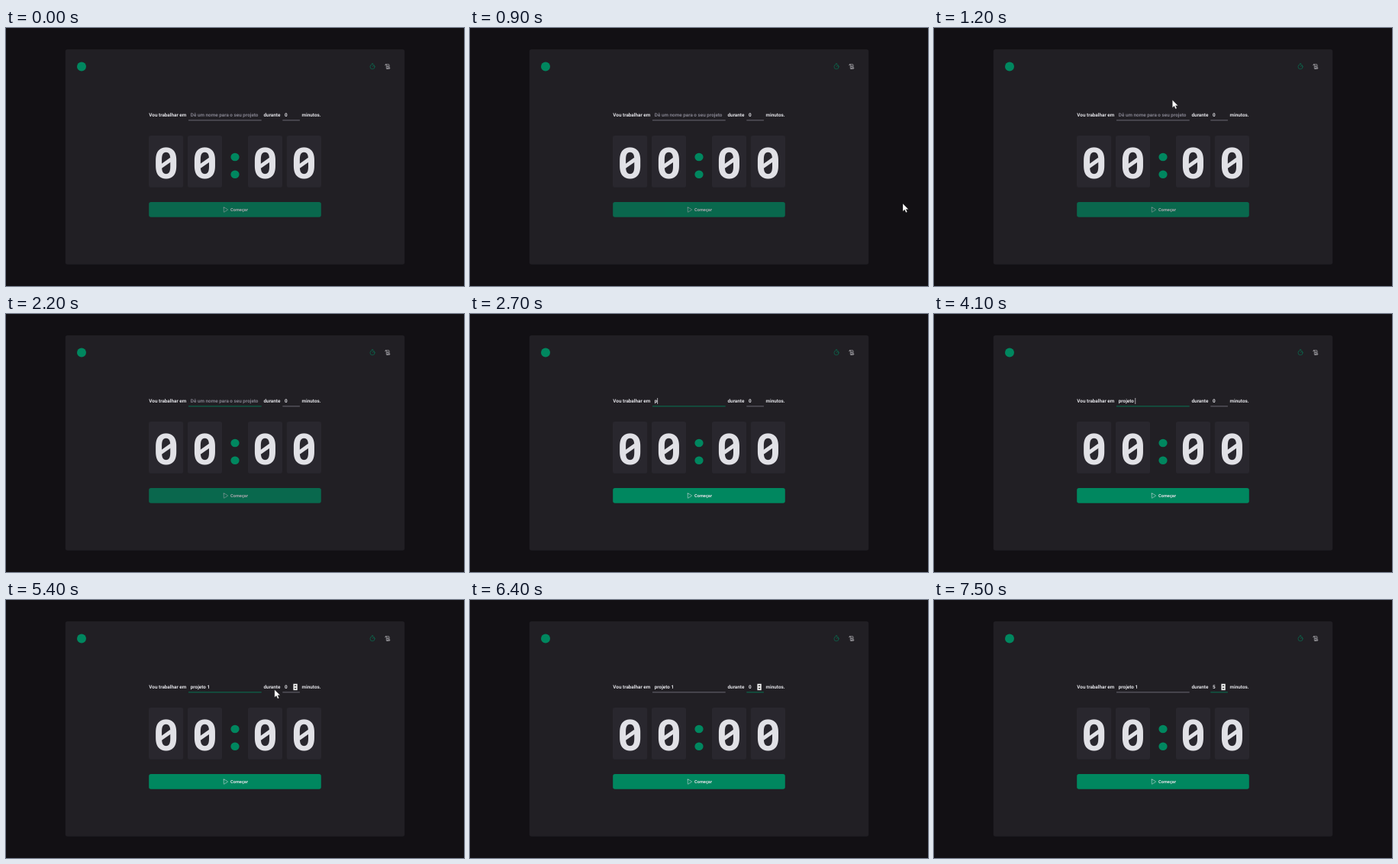
These frames come from a looping animation (600 px wide and 338 px high, 8000 ms). An HTML page:

```html
<!DOCTYPE html>
<html lang="pt">
<head>
<meta charset="utf-8">
<style>
  html, body { margin: 0; width: 100%; height: 100%; overflow: hidden; background: #121014; }
  svg { display: block; width: 100%; height: 100%; }
  text { font: 700 6.35px Roboto, sans-serif; fill: #e1e1e6; white-space: pre; text-rendering: geometricPrecision; }
  .digit { font-size: 56.4px; text-anchor: middle; }
  .icon { fill: none; stroke: #e1e1e6; stroke-width: 16; stroke-linecap: round; stroke-linejoin: round; }
  .green { fill: #00875f; }
</style>
</head>
<body>
<svg viewBox="0 0 600 338">
  <defs>
    <g id="zero">
      <rect x="-22.6" y="141" width="45.2" height="67.7" rx="2.8" fill="#29272e"/>
      <text class="digit" y="196.9">0</text>
      <path d="M-7 181.7L7 171.9" stroke="#e1e1e6" stroke-width="5"/>
    </g>
  </defs>
  <rect x="77.8" y="28" width="444.4" height="281.8" rx="2.8" fill="#211f24"/>

  <circle class="green" cx="99" cy="50.5" r="6"/>
  <g class="icon" style="stroke:#00875f" transform="translate(475.8 46.3) scale(.0331)">
    <circle cx="128" cy="136" r="92"/>
    <path d="M128 136l42-42M104 10h48"/>
  </g>
  <g class="icon" transform="translate(495.4 46.3) scale(.0331)">
    <path d="M45 80A24 24 0 1 1 88 64V192a24 24 0 1 0 43-16H219A24 24 0 0 1 200 216H112"/>
    <path d="M64 40H176a24 24 0 0 1 24 24V176M120 104h48M120 136h48"/>
  </g>

  <text x="187.3" y="116.3">Vou trabalhar em</text>
  <text x="337.5" y="116.3">durante</text>
  <text x="387.6" y="116.3">minutos.</text>
  <text id="project" x="241.8" y="116.3" xml:space="preserve"></text>
  <text id="minutes" x="365" y="116.3" xml:space="preserve"></text>
  <rect id="projectLine" x="239" y="120.5" width="95.7" height=".8"/>
  <rect id="minutesLine" x="362.3" y="120.5" width="22.6" height=".8"/>
  <rect id="caret" y="110" width=".7" height="8" fill="#e1e1e6"/>
  <g id="spinner">
    <rect x="376.4" y="109.8" width="5.3" height="8.4" fill="#efefef"/>
    <path d="M377.6 113l1.45-1.9 1.45 1.9zM377.6 115l1.45 1.9 1.45-1.9z" fill="#333"/>
  </g>

  <use href="#zero" x="209.6"/>
  <use href="#zero" x="260.5"/>
  <use href="#zero" x="339.5"/>
  <use href="#zero" x="390.4"/>
  <ellipse class="green" cx="300" cy="169" rx="5.6" ry="5.3"/>
  <ellipse class="green" cx="300" cy="191.8" rx="5.6" ry="5.3"/>

  <g id="button">
    <rect class="green" x="187.2" y="228" width="225.6" height="19.8" rx="2.8"/>
    <path class="icon" transform="translate(282.9 233.8) scale(.0331)" d="M72 40V216a8 8 0 0 0 12 7L228 135a8 8 0 0 0 0-14L84 33a8 8 0 0 0-12 7z"/>
    <text x="294.1" y="240.1" style="font-size:5.65px">Começar</text>
  </g>

  <path id="cursor" d="M0 0V10.2L2.4 8 4.1 11.8 5.8 11 4.2 7.4H7.4z" fill="#fff" stroke="#111" stroke-width=".3"/>
</svg>
<script>
const $ = id => document.getElementById(id);
const LOOP = 8000;

const projectKeys = [[0, ''], [2700, 'p'], [2900, 'pr'], [3100, 'pro'], [3400, 'proj'], [3500, 'proje'],
  [3700, 'projet'], [3800, 'projeto'], [4100, 'projeto '], [4800, 'projeto 1']];
const minuteKeys = [[0, '0'], [6900, ''], [7000, '5']];
const caretKeys = [[0, 0], [1700, 1], [2200, 0], [2700, 1], [4700, 0], [4800, 1], [5400, 0],
  [5800, 1], [6400, 0], [6800, 1], [7500, 0]];

// Pointer passes: time, x, y; each ends when the pointer enters a field
const passes = [
  { end: 1700, points: [[900, 567, 230], [1200, 312.3, 94.3], [1400, 98, 36], [1600, 225, 98], [1700, 260, 112]] },
  { end: 5600, points: [[5400, 351.8, 117.4], [5600, 364, 113]] }
];

const valueAt = (keys, t) => keys.findLast(k => k[0] <= t)[1];
const show = (id, on) => $(id).setAttribute('visibility', on ? 'visible' : 'hidden');

function field(id, value, placeholder, focused) {
  const text = $(id);
  text.textContent = value || placeholder;
  text.style.fill = value ? '#e1e1e6' : '#82808c';
  $(id + 'Line').setAttribute('fill', focused ? '#00875f' : '#7c7a85');
  if (focused) {
    const width = value ? text.getComputedTextLength() : 0;
    $('caret').setAttribute('x', +text.getAttribute('x') + width);
  }
}

function movePointer(t) {
  const step = Math.floor(t / 100) * 100;
  const pass = passes.find(p => step >= p.points[0][0] && step < p.end);
  show('cursor', pass);
  if (!pass) return;
  const i = pass.points.findIndex(p => p[0] > step);
  const [t0, x0, y0] = pass.points[i - 1], [t1, x1, y1] = pass.points[i];
  const k = (step - t0) / (t1 - t0);
  $('cursor').setAttribute('transform', `translate(${x0 + (x1 - x0) * k} ${y0 + (y1 - y0) * k})`);
}

function draw(now) {
  const t = now % LOOP;
  field('project', valueAt(projectKeys, t), 'Dê um nome para o seu projeto', t >= 1700 && t < 5800);
  field('minutes', valueAt(minuteKeys, t), '00', t >= 5800);
  show('caret', valueAt(caretKeys, t));
  show('spinner', t >= 5400);
  $('button').setAttribute('opacity', t < 2700 ? .7 : 1);
  movePointer(t);
}

const start = performance.now();
function tick() {
  draw(performance.now() - start);
  requestAnimationFrame(tick);
}
tick();
</script>
</body>
</html>
```
